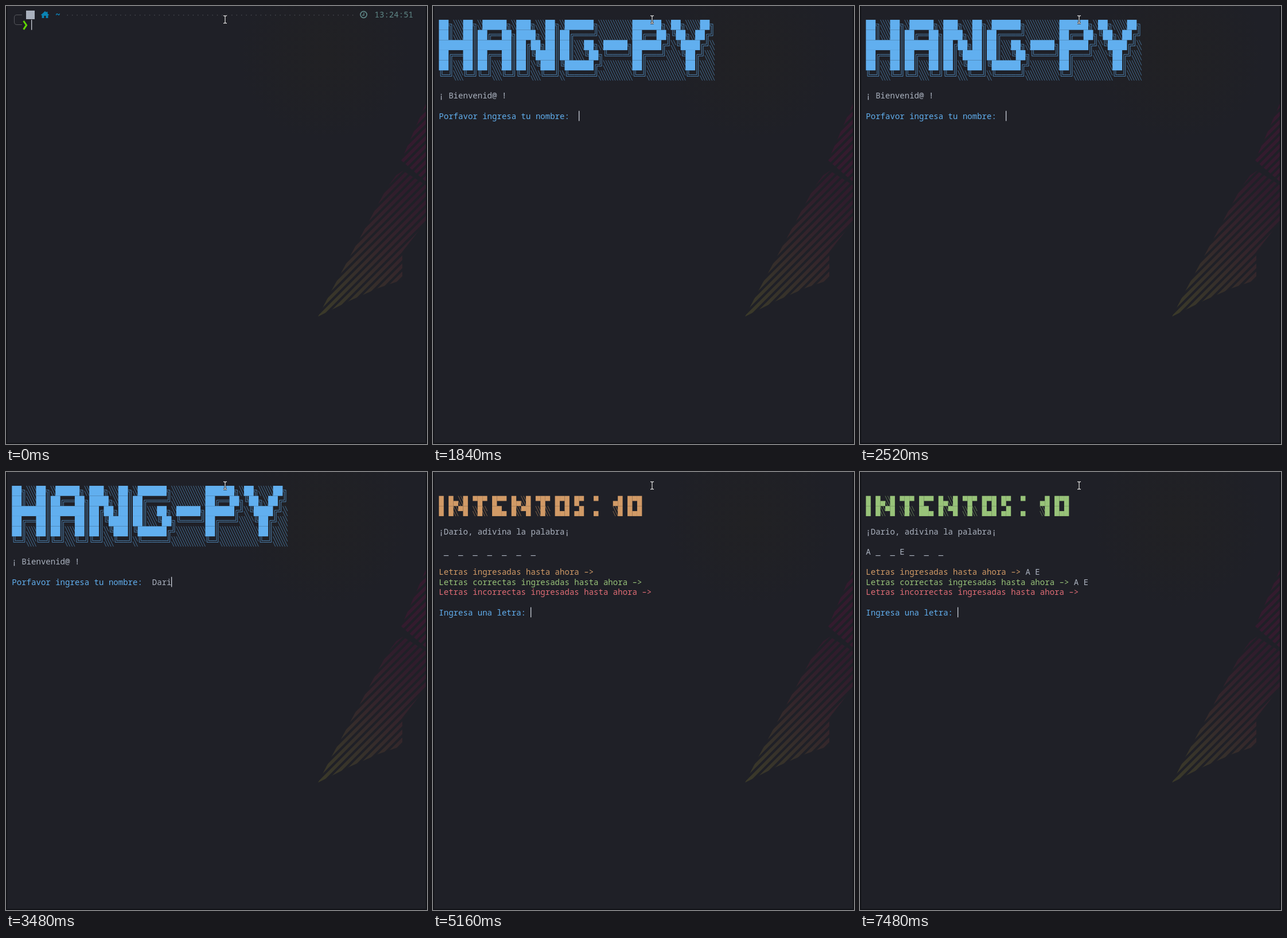
Write an HTML page with a canvas that moves like this. It is 734 px wide and 763 px high and loops after 8 s.

```html
<!DOCTYPE html>
<html lang="es">
<head>
<meta charset="utf-8">
<title>Hang-py</title>
<style>
html, body { margin: 0; width: 100%; height: 100%; overflow: hidden; background: #1f2027; }
canvas { display: block; }
</style>
</head>
<body>
<canvas id="stage" width="734" height="763"></canvas>
<script>
const W = 734, H = 763, LOOP = 8000;
const CW = 8.43, CH = 17.63, X0 = 10.3, Y0 = 6.4;
const FAMILY = '"Noto Sans Mono", "DejaVu Sans Mono", monospace';
const GREY = '#abb2bf', BLUE = '#61afef', PINK = '#c678dd', ORANGE = '#d19a66',
      GREEN = '#98c379', RED = '#e06c75';
const PLAYER = 'Dario';

const TITLE = [
  '██╗░░██╗░█████╗░███╗░░██╗░██████╗░░░░░░░██████╗░██╗░░░██╗',
  '██║░░██║██╔══██╗████╗░██║██╔════╝░░░░░░░██╔══██╗╚██╗░██╔╝',
  '███████║███████║██╔██╗██║██║░░██╗░█████╗██████╔╝░╚████╔╝░',
  '██╔══██║██╔══██║██║╚████║██║░░╚██╗╚════╝██╔═══╝░░░╚██╔╝░░',
  '██║░░██║██║░░██║██║░╚███║╚██████╔╝░░░░░░██║░░░░░░░░██║░░░',
  '╚═╝░░╚═╝╚═╝░░╚═╝╚═╝░░╚══╝░╚═════╝░░░░░░░╚═╝░░░░░░░░╚═╝░░░'
];
const TRIES = [
  '█ █▄░█ ▀█▀ █▀▀ █▄░█ ▀█▀ █▀█ █▀  ▀   ▄█ █▀█',
  '█ █░▀█ ░█░ ██▄ █░▀█ ░█░ █▄█ ▄█  ▄   ░█ █▄█'
];

const g = document.getElementById('stage').getContext('2d');
const colX = c => X0 + c * CW;
const rowY = r => Y0 + r * CH;

// Size the font so that one character fills one cell.
g.font = '100px ' + FAMILY;
const FONT = (100 * CW / g.measureText('n').width).toFixed(2) + 'px ' + FAMILY;

function line(ctx, ...pts) {
  ctx.beginPath();
  for (let i = 0; i < pts.length; i += 2) ctx.lineTo(pts[i], pts[i + 1]);
  ctx.stroke();
}

// Hyphens are shown wide, as in the terminal's face.
function text(col, row, str, color) {
  g.fillStyle = color;
  [...str.replace(/-/g, '–')].forEach((ch, i) => {
    if (ch !== ' ') g.fillText(ch, colX(col + i), rowY(row) + 14);
  });
}

function beam(col, row) {
  g.fillStyle = '#c9ced8';
  g.fillRect(Math.floor(colX(col)), rowY(row), 1.3, CH);
}

function hatch(x, y) {
  const h = CW / 2, v = CH / 2;
  g.globalAlpha = .6;
  g.lineWidth = .9;
  line(g, x, y, x + CW, y + CH);
  line(g, x + h, y, x + CW, y + v);
  line(g, x, y + v, x + h, y + CH);
  g.globalAlpha = 1;
}

function doubleLine(ch, x, y) {
  const d = 1.4, mx = x + CW / 2, my = y + CH / 2, r = x + CW, b = y + CH;
  g.globalAlpha = .75;
  g.lineWidth = .9;
  for (const s of [-d, d]) {
    if (ch === '═') line(g, x, my + s, r, my + s);
    if (ch === '║') line(g, mx + s, y, mx + s, b);
    if (ch === '╗') line(g, x, my - s, mx + s, my - s, mx + s, b);
    if (ch === '╔') line(g, r, my + s, mx + s, my + s, mx + s, b);
    if (ch === '╝') line(g, x, my + s, mx + s, my + s, mx + s, y);
    if (ch === '╚') line(g, r, my - s, mx + s, my - s, mx + s, y);
  }
  g.globalAlpha = 1;
}

function blocks(rows, top, color) {
  g.fillStyle = g.strokeStyle = color;
  rows.forEach((str, r) => {
    const y = rowY(top + r);
    // Runs of one block are drawn in one piece, so columns show no seam.
    for (const { 0: run, index } of str.matchAll(/█+|▀+|▄+|[^█▀▄ ]/g)) {
      const x = colX(index), w = run.length * CW;
      if (run[0] === '█') g.fillRect(x, y, w, CH);
      else if (run[0] === '▀') g.fillRect(x, y, w, CH / 2);
      else if (run[0] === '▄') g.fillRect(x, y + CH / 2, w, CH / 2);
      else if (run === '░') hatch(x, y);
      else doubleLine(run, x, y);
    }
  });
}

function glow(ctx, x, y, r, color, mid = .5) {
  const grad = ctx.createRadialGradient(x, y, 0, x, y, r);
  grad.addColorStop(0, `rgba(${color},1)`);
  grad.addColorStop(mid, `rgba(${color},.6)`);
  grad.addColorStop(1, `rgba(${color},0)`);
  ctx.fillStyle = grad;
  ctx.fillRect(0, 0, W, H);
}

function stripes(ctx, pts, fill) {
  ctx.save();
  ctx.beginPath();
  pts.forEach(p => ctx.lineTo(...p));
  ctx.clip();
  ctx.strokeStyle = fill;
  ctx.lineWidth = 5.8;
  for (let s = 891.5; s < 1190; s += 14) line(ctx, s - 140, 140, s - 560, 560);
  ctx.restore();
}

function makeBackdrop() {
  const cv = document.createElement('canvas');
  cv.width = W;
  cv.height = H;
  const b = cv.getContext('2d');
  b.fillStyle = '#1f2027';
  b.fillRect(0, 0, W, H);
  glow(b, 555, 85, 150, '33,33,36');

  const grad = b.createLinearGradient(545, 540, 725, 340);
  grad.addColorStop(0, '#3b3a29');
  grad.addColorStop(.3, '#36312a');
  grad.addColorStop(.6, '#34252b');
  grad.addColorStop(1, '#301c2c');
  stripes(b, [[544, 541], [568, 495], [617, 404], [664, 317], [680, 295], [692, 287],
    [732, 312], [732, 376], [691, 428], [691, 477], [650, 491], [600, 513]], grad);
  stripes(b, [[732, 170], [689, 269], [732, 306]], '#341b2e');

  b.fillStyle = '#111217';
  b.fillRect(0, 0, 2, H);
  b.fillRect(0, 761, W, 2);
  b.fillRect(732, 0, 2, H);
  return cv;
}
const backdrop = makeBackdrop();

// Bare wallpaper that shows through for a moment.
function flash() {
  g.save();
  g.beginPath();
  g.rect(2, 33, 730, 104.5);
  g.clip();
  const base = g.createLinearGradient(0, 0, W, 0);
  base.addColorStop(0, '#1f0b22');
  base.addColorStop(.45, '#270d25');
  base.addColorStop(.8, '#35132a');
  base.addColorStop(1, '#210c25');
  g.fillStyle = base;
  g.fillRect(0, 0, W, H);
  glow(g, 555, 92, 165, '72,29,44');
  g.restore();
}

function mouse() {
  const shape = () => {
    line(g, 379, 17, 381, 17, 382, 18, 383, 17, 385, 17);
    line(g, 382, 18, 382, 29);
    line(g, 379, 30, 381, 30, 382, 29, 383, 30, 385, 30);
  };
  g.strokeStyle = '#101014';
  g.lineWidth = 3;
  shape();
  g.strokeStyle = '#d0d0d2';
  g.lineWidth = 1.4;
  shape();
}

function prompt(t) {
  g.strokeStyle = '#55565c';
  g.lineWidth = 1;
  g.beginPath();
  g.moveTo(28, 15.5);
  g.lineTo(19, 15.5);
  g.quadraticCurveTo(14.5, 15.5, 14.5, 20);
  g.lineTo(14.5, 28);
  g.quadraticCurveTo(14.5, 32.5, 19, 32.5);
  g.lineTo(28, 32.5);
  g.stroke();

  g.fillStyle = '#a9b0bd';
  g.fillRect(35, 8, 15, 15);

  // House
  g.fillStyle = '#0a84b4';
  g.beginPath();
  [[60.5, 16], [68, 9], [70.5, 11.3], [70.5, 10], [72.5, 10], [72.5, 13.2], [75.5, 16],
   [73.4, 16], [73.4, 21], [69.6, 21], [69.6, 17], [66.4, 17], [66.4, 21], [62.6, 21],
   [62.6, 16]].forEach(p => g.lineTo(...p));
  g.fill();
  g.save();
  g.font = 'bold ' + FONT;
  text(9, 0, '~', '#0a9bdc');
  g.restore();

  g.fillStyle = '#4b4d54';
  for (let c = 11; c < 71; c++) g.fillRect(colX(c) + 3.5, 15.2, 1.4, 1.4);

  // Clock
  g.strokeStyle = '#5f8787';
  g.lineWidth = 1.7;
  g.beginPath();
  g.arc(623.5, 15, 5.6, 0, 7);
  g.stroke();
  g.lineWidth = 1.3;
  line(g, 624, 11.5, 624, 16, 620.8, 16);
  text(75, 0, '13:24:51', '#5f8787');

  g.strokeStyle = '#5fd700';
  g.lineWidth = 3;
  line(g, 30.6, 26, 35.6, 33.4, 30.6, 40.8);

  const cmd = 'hangpy';
  const n = t < 720 ? 0 : t < 800 ? 1 : t < 960 ? 2 : t < 1440 ? 3 : 6;
  if (n) {
    text(4, 1, cmd.slice(0, n), n < 6 ? RED : GREEN);
    text(4 + n, 1, cmd.slice(n), '#5c6370');
  }
  beam(4 + n, 1);
}

function welcome(t) {
  blocks(TITLE, 1, BLUE);
  if (t >= 2440 && t < 2520) flash();
  text(0, 8, '¡ Bienvenid@ !', GREY);
  text(0, 10, 'Porfavor ingresa tu nombre:', BLUE);
  const n = [2880, 3120, 3240, 3480, 3640].filter(k => t >= k).length;
  text(29, 10, PLAYER.slice(0, n), GREY);
  if (t < 3920) {
    beam(29 + n, 10);
    return;
  }
  text(0, 12, 'TOP PLAYERS', PINK);
  text(0, 13, '-'.repeat(23), PINK);
  ['AAA', 'BBB', 'CCC'].forEach((s, i) => text(0, 15 + i, `${i + 1})${s} -> 0`, GREY));
  text(0, 19, '-'.repeat(23), PINK);
  text(0, 21, PLAYER + ', espero que te diviertas jugando a Hang-py  :D', GREY);
  text(0, 22, 'Las reglas son simples, tienes 10 intentos para adivinar la totalidad', GREY);
  text(0, 23, 'de letras que conforman una palabra, escogida al azar.', GREY);
  text(0, 25, '¿List@ para jugar?  (Presiona enter para continuar)', ORANGE);
  beam(53, 25);
}

function game(t) {
  const turn = t < 6160 ? 0 : t < 7480 ? 1 : 2;
  const found = ['', 'A', 'A E'][turn];
  const word = [' _  _  _  _  _  _  _', 'A _  _  _  _  _  _', 'A _  _ E _  _  _'][turn];
  blocks(TRIES, 2, turn ? GREEN : ORANGE);
  text(0, 5, '¡' + PLAYER + ', adivina la palabra¡', GREY);
  text(0, 7, word, GREY);
  text(0, 9, 'Letras ingresadas hasta ahora ->', ORANGE);
  text(33, 9, found, GREY);
  text(0, 10, 'Letras correctas ingresadas hasta ahora ->', GREEN);
  text(43, 10, found, GREY);
  text(0, 11, 'Letras incorrectas ingresadas hasta ahora ->', RED);
  text(0, 13, 'Ingresa una letra:', BLUE);
  const typed = turn === 0 && t >= 5960 ? 'a' : turn === 1 && t >= 7280 ? 'e' : '';
  text(19, 13, typed, GREY);
  beam(19 + typed.length, 13);
}

function draw(now) {
  const t = now % LOOP;
  g.font = FONT;
  g.drawImage(backdrop, 0, 0);
  (t < 1840 ? prompt : t < 5160 ? welcome : game)(t);
  mouse();
}

let start;
function tick(now) {
  start ??= now;
  draw(now - start);
  requestAnimationFrame(tick);
}
requestAnimationFrame(tick);
</script>
</body>
</html>
```
